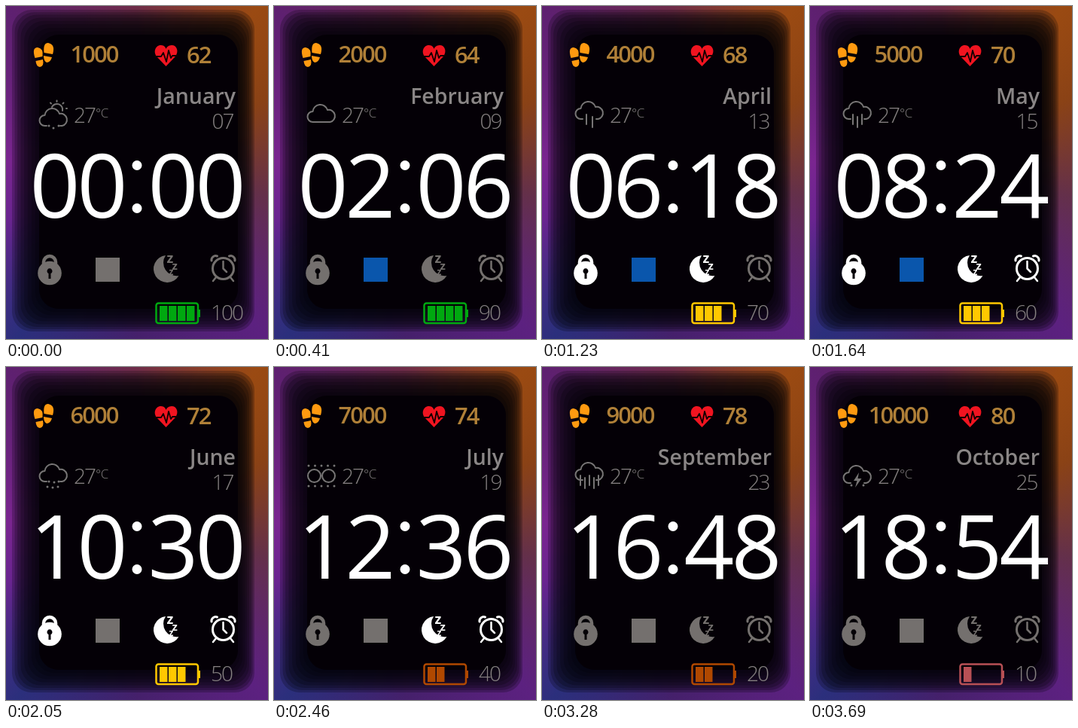
Write an HTML page that moves like this. It is 348 px wide and 442 px high and loops after 4100 ms.

```html
<!DOCTYPE html>
<html lang="en">
<head>
<meta charset="utf-8">
<title>Watch face</title>
<style>
  html, body { margin: 0; width: 100%; height: 100%; overflow: hidden; }
  body {
    background: conic-gradient(#6e2c48, #9a4a12 36deg, #8a4216 60deg, #64304a 100deg, #5c2180 142deg,
      #45206b 180deg, #2b2f7c 216deg, #6a2490 250deg, #7a2590 275deg, #5e2070 322deg, #6e2c48);
  }
  svg { display: block; width: 348px; height: 442px; }
  text { font-family: "Open Sans", "Noto Sans", sans-serif; }
  .big { font-size: 117px; letter-spacing: -4px; fill: #fff; }
  .gold { font-size: 31px; font-weight: 600; letter-spacing: -2px; fill: #b08038; }
  .thin { font-size: 28px; font-weight: 300; letter-spacing: -2px; fill: #858080; }
  .month { font-size: 28.5px; font-weight: 600; fill: #8a8686; text-anchor: end; }
  .line { fill: none; stroke: currentColor; stroke-linecap: round; stroke-linejoin: round; }
  g { fill: currentColor; }
</style>
</head>
<body>
<svg viewBox="0 0 348 442">
  <g id="bands" style="color:#040006"></g>

  <g style="color:#ff9a10">
    <path d="M38.500 69Q34 55 42 55Q50 56 48.500 67ZM39.500 73L49 71Q51 80 45 81Q40 80 39.500 73Z"/>
    <path d="M50.500 62Q49 49 56 49Q66 51 62 64ZM50 66L61 68Q59 75 54 75Q50 73 50 66Z"/>
  </g>
  <path fill="#f01420" d="M212.500 80L200 67C195 60 199 52 206 52C210 52 212 55 212.500 57C213 55 216 52 220 52C227 52 230 60 225 67Z"/>
  <path class="line" style="color:#100" stroke-width="1.800" d="M198 67H206L209 62L213 74L216 59L219 69L221 66H228"/>
  <text id="steps" class="gold" x="117" y="75" text-anchor="middle"/></text>
  <text id="pulse" class="gold" x="240" y="76"></text>

  <g id="weather" style="color:#777575"></g>
  <text class="thin" x="90" y="155">27</text>
  <text class="thin" x="119" y="148" style="font-size:17px;letter-spacing:-.5px">°C</text>
  <text id="month" class="month" x="305" y="130"></text>
  <text id="day" class="thin" x="273.500" y="163"></text>

  <text id="hours" class="big" x="31.500" y="281"></text>
  <text id="minutes" class="big" x="188.500" y="281"></text>
  <circle cx="174" cy="211.500" r="6.500" fill="#fff"/>
  <circle cx="174" cy="268.500" r="6.500" fill="#fff"/>

  <g id="lock">
    <path class="line" stroke-width="4.500" d="M50 345V340a8 8 0 0 1 16 0V345"/>
    <circle cx="58" cy="354.500" r="15.800"/>
    <path fill="#040006" d="M56.500 355a3.500 3.500 0 1 1 3 0V362h-3Z"/>
  </g>
  <g id="link"><rect x="119" y="334" width="32" height="32"/></g>
  <g id="moon">
    <path d="M212 331A18 18 0 1 0 229.500 358A17.500 17.500 0 0 1 212 331Z"/>
    <g font-weight="700">
      <text x="213.500" y="341" font-size="18">z</text>
      <text x="220.500" y="350" font-size="15">z</text>
      <text x="216.500" y="357" font-size="12">z</text>
    </g>
  </g>
  <g id="alarm">
    <circle class="line" cx="288.500" cy="348.500" r="14" stroke-width="3"/>
    <path class="line" stroke-width="2.500" d="M288.500 339V348.500L293 353M279 360L275 365M298 360L302 365"/>
    <path class="line" stroke-width="3" d="M273 338a5.500 5.500 0 0 1 7.500 -6M304 338a5.500 5.500 0 0 0 -7.500 -6"/>
  </g>

  <g id="battery"></g>
  <text id="charge" class="thin" x="272" y="417"></text>
</svg>
<script>
const $ = id => document.getElementById(id);
const STEP = 410, COUNT = 10;
const months = ["January", "February", "March", "April", "May", "June", "July", "August", "September", "October"];
const levels = ["#00a810", "#ffc800", "#b04800", "#b85055"];
const two = n => String(n).padStart(2, "0");

// Nested translucent frames darken the glow towards the screen.
const frame = (t, alpha) => {
  const x = 8 + 36 * t, y = 5 + 33 * t;
  return `<rect x="${x}" y="${y}" width="${330 - 22 * t - x}" height="${432 - 30 * t - y}" rx="26" opacity="${alpha}"/>`;
};
$("bands").innerHTML = [0, .1, .2, .32, .45, .58, .72, .86].map(t => frame(t, .23)).join("") + frame(1, 1);

const line = d => `<path class="line" stroke-width="2" d="${d}"/>`;
const dots = (...pts) => pts.map(([x, y]) => `<circle cx="${x}" cy="${y}" r="1.500"/>`).join("");
const cloud = y => line(`M54 ${y}H51.500a7 7 0 0 1 0 -14a10 10 0 0 1 19.500 -2a8 8 0 0 1 3.500 16H72`);
const rain = (...xs) => line(xs.map((x, i) => `M${x} ${144 + i % 2 * 3}V${157 + i % 2 * 4}`).join(""));
const drops = y => dots([57, y], [63, y + 3], [70, y]);
const sun = line("M61 134a7.500 7.500 0 0 1 14 5M67.500 125.500V127M59 128.500L60 129.500M76.500 128.500L75.500 129.500M80 136H81");
const haze = [131, 158].map(y => dots(...[46, 54.5, 63, 71.5, 80].map(x => [x, y]))).join("") +
  [53.5, 72.5].map(x => `<circle class="line" stroke-width="2" cx="${x}" cy="144.500" r="8.500"/>`).join("");
const bolt = `<path d="M65 140L58 151H62.500L60 160L68.500 148H63.500Z"/>`;

const skies = [
  sun + cloud(159) + drops(159),
  cloud(154) + line("M54 154H72"),
  cloud(154) + drops(154),
  cloud(150) + rain(59, 67),
  cloud(150) + rain(57, 63, 69),
  cloud(152) + dots([57, 152], [64, 153], [70, 152], [55, 159], [62, 160], [69, 159]),
  haze,
  cloud(150) + rain(55, 60, 65, 70),
  cloud(150) + rain(51, 57, 63, 69, 75),
  cloud(154) + bolt + dots([55, 157], [71, 157])
];

// Each icon lights up for four steps, one after another.
const icons = { link: [1, "#0a56ac"], lock: [2, "#fff"], moon: [3, "#fff"], alarm: [4, "#fff"] };

function show(i) {
  const values = {
    steps: (i + 1) * 1000, pulse: 62 + 2 * i, month: months[i], day: two(7 + 2 * i),
    hours: two(2 * i), minutes: two(6 * i), charge: 100 - 10 * i
  };
  for (const id in values) $(id).textContent = values[id];
  for (const id in icons) {
    const [start, color] = icons[id];
    $(id).style.color = i >= start && i < start + 4 ? color : "#74706e";
  }
  $("weather").innerHTML = skies[i];

  const level = Math.floor(i / 3);
  let bars = `<rect class="line" x="199.500" y="394.500" width="55.500" height="26.500" rx="3" stroke-width="2.500"/>
    <rect x="255.500" y="403" width="2.500" height="10"/>`;
  for (let n = 0; n < 4 - level; n++) bars += `<rect x="${204 + 12 * n}" y="398" width="10.500" height="20"/>`;
  $("battery").style.color = levels[level];
  $("battery").innerHTML = bars;
}

let shown = -1;
const begin = performance.now();
function tick() {
  const i = Math.floor((performance.now() - begin) / STEP) % COUNT;
  if (i !== shown) show(shown = i);
  requestAnimationFrame(tick);
}
tick();
</script>
</body>
</html>
```
